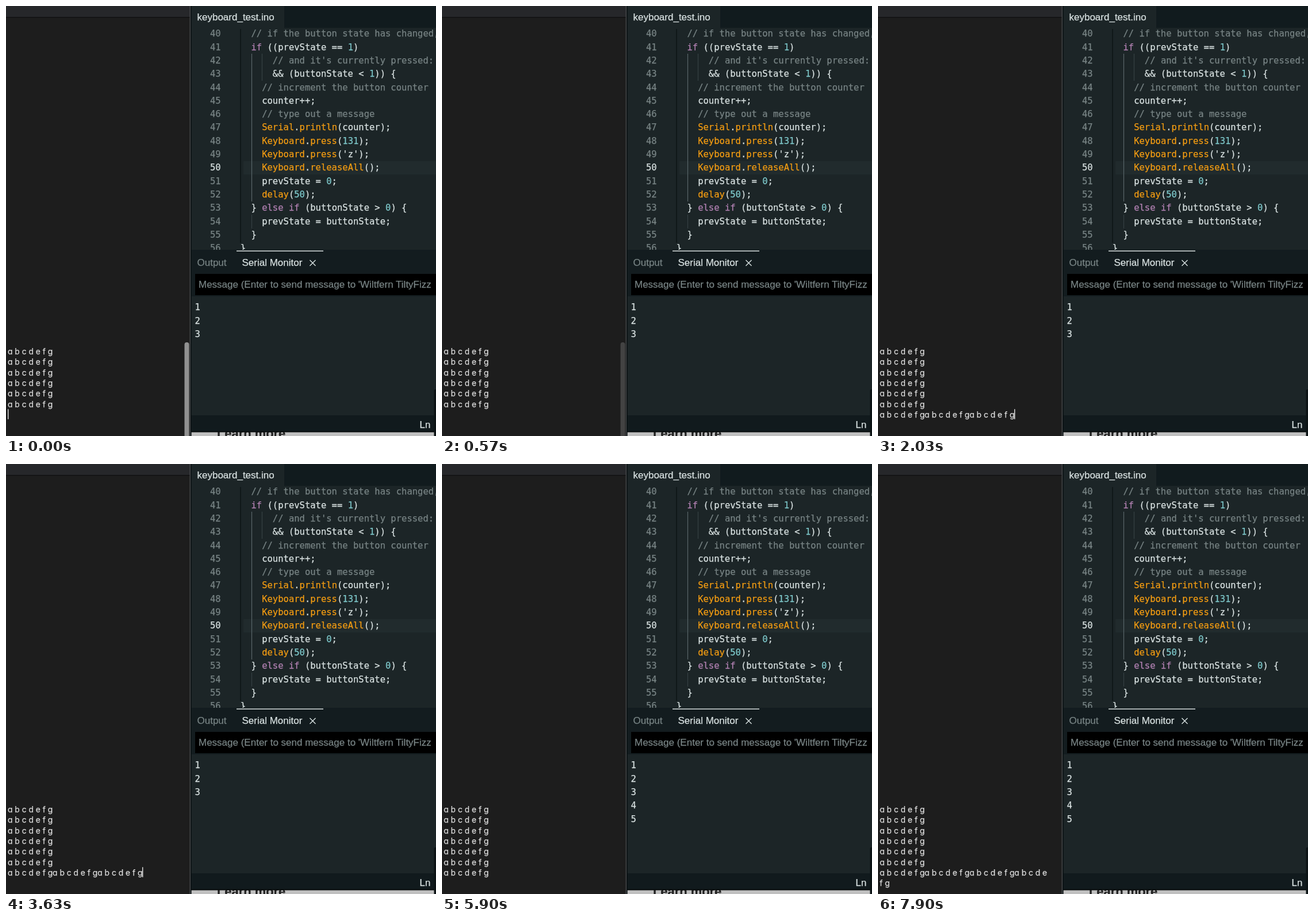
An HTML page that plays this animation: 748x748 px, repeating every 8 s.

```html
<!DOCTYPE html>
<html lang="en">
<head>
<meta charset="utf-8">
<title>Keyboard test</title>
<style>
  html, body { margin: 0; width: 100%; height: 100%; overflow: hidden; background: #1d1d1d; }
  svg { display: block; width: 100vw; height: 100vh; }
  text { white-space: pre; --ink: #dae3e3; }
  text, tspan { fill: var(--ink); stroke: var(--ink); stroke-width: .25px; }
  .ui { font: 17px "Liberation Sans", Arial, sans-serif; }
  .code { font: 15.53px "DejaVu Sans Mono", monospace; }
  .notes text { font: 13.8px Inter, sans-serif; font-feature-settings: "cv11"; --ink: #dedede; }
  .dim, .comment { --ink: #788485; }
  .keyword { --ink: #b583b5; }
  .number { --ink: #7fcbcd; }
  .call { --ink: #f39c12; }
  .page { font: bold 21.9px "Liberation Sans", Arial, sans-serif; --ink: #222; }
</style>
</head>
<body>
<svg viewBox="0 0 748 748">
  <defs>
    <clipPath id="editorClip"><rect x="322" y="38" width="426" height="386"/></clipPath>
  </defs>

  <!-- text window -->
  <rect width="322" height="748" fill="#1d1d1d"/>
  <rect width="320" height="19" fill="#26272a"/>
  <rect y="19" width="320" height="1.5" fill="#111112"/>
  <g class="notes" id="notes"></g>
  <rect id="caret" width="1.4" height="17.5" fill="#e4e4e4"/>
  <rect id="scrollbar" x="310.5" y="585" width="8" height="180" rx="4" fill="#919191"/>

  <!-- page behind the editor window -->
  <rect x="322" y="741" width="426" height="7" fill="#c0c0c0"/>
  <text class="page" x="367" y="751">Learn more</text>

  <!-- editor window -->
  <rect x="322" width="426" height="741" fill="#1c2527"/>
  <rect x="484" width="264" height="38" fill="#111b1e"/>
  <text class="ui" x="332.5" y="25">keyboard_test.ino</text>
  <g clip-path="url(#editorClip)">
    <rect x="413" y="270" width="335" height="23" fill="#212b2d"/>
    <g stroke="#354143" stroke-width="1.2">
      <path d="M408 40V412" stroke="#101819" stroke-width="2"/>
      <path d="M445.5 83V130M427.5 363V387"/>
      <path d="M427.5 83V340" stroke="#59666a"/>
    </g>
    <g class="code" id="code"></g>
  </g>

  <!-- serial monitor -->
  <rect x="322" y="424" width="426" height="81" fill="#131c1f"/>
  <rect x="401" y="425.4" width="151" height="1.6" fill="#ccd3d3"/>
  <text class="ui dim" x="332.5" y="452">Output</text>
  <text class="ui" x="410.5" y="452">Serial Monitor</text>
  <path d="M528.5 442l10 10m0-10l-10 10" stroke="#dae3e3" stroke-width="1.4"/>
  <rect x="329" y="466" width="419" height="37" fill="#000"/>
  <text class="ui dim" x="335" y="490">Message (Enter to send message to 'Wiltfern TiltyFizz</text>
  <g class="code" id="serial"></g>

  <!-- status bar and edges -->
  <rect x="322" y="712" width="426" height="28" fill="#111a1d"/>
  <text class="ui" x="719.5" y="733.5">Ln</text>
  <rect x="322" y="739.5" width="426" height="2" fill="#080c0d"/>
  <rect x="744.5" y="667" width="6" height="90" rx="2" fill="#0c1315"/>
  <rect x="319.7" width="1.3" height="748" fill="#4a4d4f"/>
  <rect x="321" width="1.6" height="748" fill="#0b1113"/>
</svg>
<script>
const LOOP = 8000;
const byId = id => document.getElementById(id);
const escapeText = s => s.replace(/&/g, "&amp;").replace(/</g, "&lt;");

// code listing
const FIRST_LINE = 40, CURRENT_LINE = 50, LINE_HEIGHT = 23.3;
const source = `
  // if the button state has changed,
  if ((prevState == 1)
      // and it's currently pressed:
      && (buttonState < 1)) {
    // increment the button counter
    counter++;
    // type out a message
    Serial.println(counter);
    Keyboard.press(131);
    Keyboard.press('z');
    Keyboard.releaseAll();
    prevState = 0;
    delay(50);
  } else if (buttonState > 0) {
    prevState = buttonState;
  }
}`.slice(1).split("\n");

const tokens = /(?<comment>\/\/.*)|(?<keyword>\b(?:if|else)\b)|(?<number>\b\d+\b)|(?<call>\b(?:Serial|Keyboard|println|press|releaseAll|delay)\b)|[^\w\s]+|\w+|\s+/g;

function highlight(line) {
  return [...line.matchAll(tokens)].map(match => {
    const kind = Object.keys(match.groups).find(name => match.groups[name]);
    const text = escapeText(match[0]);
    return kind ? `<tspan class="${kind}">${text}</tspan>` : text;
  }).join("");
}

byId("code").innerHTML = source.map((line, i) => {
  const y = 53.3 + i * LINE_HEIGHT, number = FIRST_LINE + i;
  return `<text x="355" y="${y}" class="${number === CURRENT_LINE ? "" : "dim"}">${number}</text>` +
         `<text x="407.8" y="${y}">${highlight(line)}</text>`;
}).join("");

byId("serial").innerHTML = [1, 2, 3, 4, 5].map((n, i) =>
  `<text x="328.5" y="${529.4 + i * LINE_HEIGHT}">${n}</text>`).join("");
const serialLines = byId("serial").children;

// typed text
const PHRASE = "a b c d e f g", PHRASE_WIDTH = 78, ROW_HEIGHT = 18.3, LAST_ROW = 6;
byId("notes").innerHTML = Array.from({ length: 8 }, (_, i) =>
  `<text x="3" y="${606 + i * ROW_HEIGHT}">${i < LAST_ROW ? PHRASE : ""}</text>`).join("");
const rows = byId("notes").children;

// [time, value] pairs
const phraseCount = [[0, 0], [1400, 1], [1700, 2], [2030, 3], [3900, 2], [4230, 1], [6630, 2], [6930, 3], [7230, 4]];
const serialCount = [[0, 3], [3700, 4], [4070, 5]];
const caretToggles = [530, 1070, 2600, 3130, 3700, 3900, 4770, 5330, 5900, 6470, 7770];

const valueAt = (steps, t) => steps.filter(([start]) => start <= t).pop()[1];

function draw(t) {
  const count = valueAt(phraseCount, t), wrapped = count === 4;
  const typed = PHRASE.repeat(count);
  rows[LAST_ROW].textContent = wrapped ? typed.slice(0, -4) : typed;
  rows[LAST_ROW + 1].textContent = wrapped ? typed.slice(-3) : "";

  const caret = byId("caret");
  const caretOn = caretToggles.filter(time => time <= t).length % 2 === 0;
  caret.setAttribute("x", wrapped ? 20.5 : 3 + count * PHRASE_WIDTH);
  caret.setAttribute("y", 701.3 + (wrapped ? ROW_HEIGHT : 0));
  caret.setAttribute("opacity", caretOn ? 1 : 0);

  const fadeStep = Math.floor((t - 470) / 33) + 1;
  byId("scrollbar").setAttribute("opacity", Math.min(1, Math.max(0, 1 - fadeStep / 6)));

  const shown = valueAt(serialCount, t);
  [...serialLines].forEach((line, i) => line.setAttribute("opacity", i < shown ? 1 : 0));
}

const startTime = performance.now();
function frame() {
  draw((performance.now() - startTime) % LOOP);
  requestAnimationFrame(frame);
}
frame();
</script>
</body>
</html>
```
